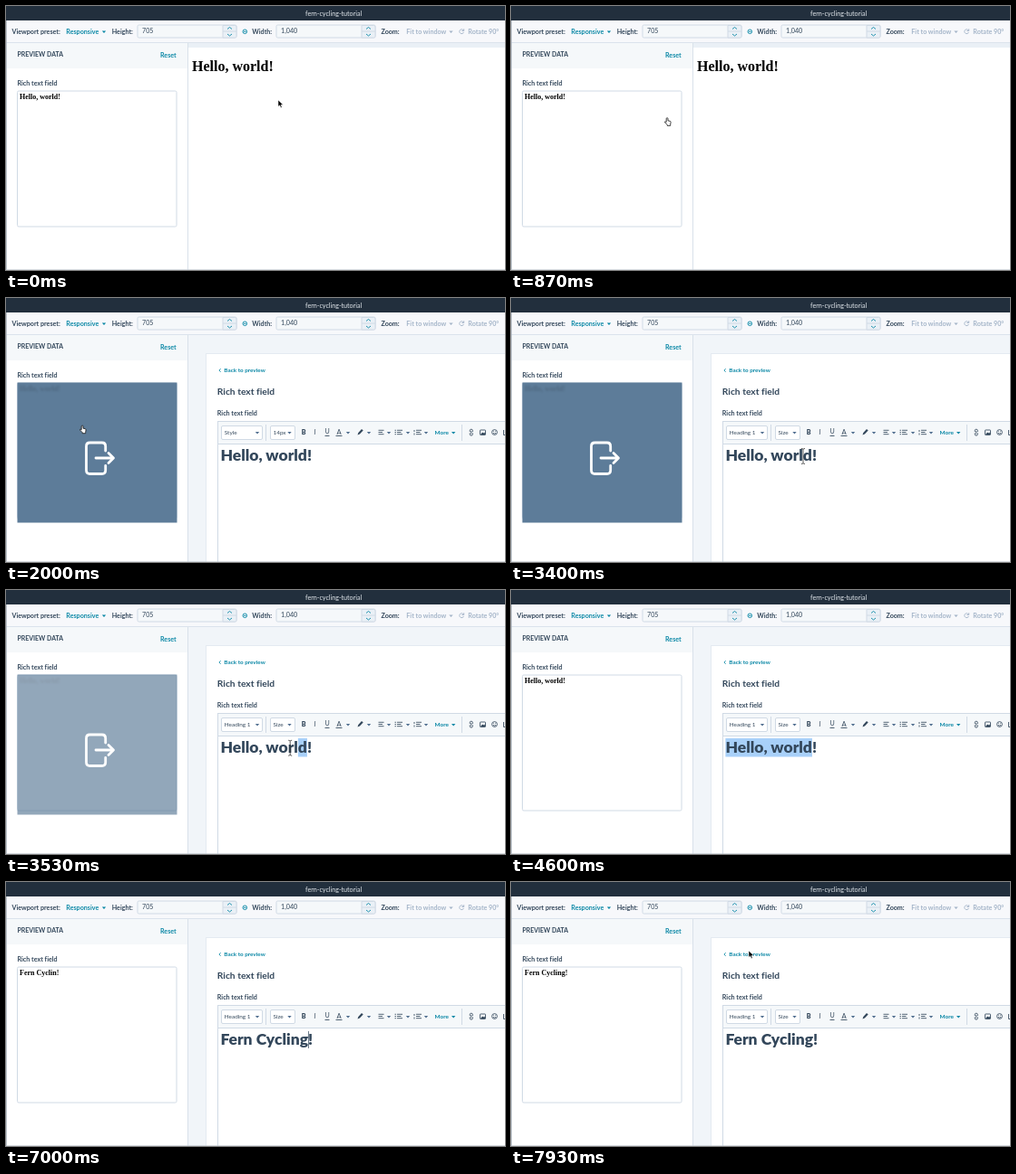
These frames come from a looping animation (550 px wide and 292 px high, 8 s). An HTML page:

```html
<!DOCTYPE html>
<html lang="en">
<head>
<meta charset="utf-8">
<title>Module preview</title>
<style>
  html, body { margin: 0; width: 100%; height: 100%; overflow: hidden; background: #fff; }
  svg { display: block; width: 550px; height: 292px; }
  text { font: 700 7.15px Lato, sans-serif; font-variant-ligatures: none; fill: #33475b; white-space: pre; }
  .reg { font-weight: 400; }
  .tool { font-size: 6.4px; }
  .link { fill: #0b88a6; }
  .off { fill: #a3b4c8; }
  .serif { font-family: "Liberation Serif", serif; fill: #000; }
  .box { fill: #f5f8fa; stroke: #d0dae5; }
  .white { fill: #fff; }
  .line { fill: none; stroke: #33475b; stroke-width: .85; }
  .teal { fill: none; stroke: #0b88a6; stroke-width: .9; }
  #blur { filter: blur(1.1px); }
</style>
</head>
<body>
<svg viewBox="0 0 550 292">
  <defs>
    <path id="down" d="M-2.2-1.1H2.2L0 1.5Z"/>
    <g id="spin">
      <rect class="box" x=".5" y=".5" width="109" height="14" rx="1.5"/>
      <path d="M94.5 1H108q1.5 0 1.5 1.5V13q0 1.5-1.5 1.5H94.5Z" fill="#eaf0f6" stroke="#d0dae5"/>
      <path d="M94.5 7.5h15" stroke="#d0dae5"/>
      <path class="teal" d="M99.5 5l2.5-2 2.5 2M99.5 10.5l2.5 2 2.5-2"/>
    </g>
    <path id="rows" class="line" d="M0-2.2H6M0 0H4.5M0 2.2H6"/>
  </defs>

  <rect width="550" height="292" fill="#fff"/>

  <!-- Rendered page -->
  <g id="page">
    <rect x="201" y="41" width="349" height="5" fill="#eaf0f6"/>
    <text class="serif" x="205" y="72" style="font-size:16px">Hello, world!</text>
  </g>

  <!-- Rich text editor -->
  <g id="editor">
    <rect x="201" y="41" width="349" height="251" fill="#f1f5f9"/>
    <rect x="220.5" y="61.5" width="340" height="240" fill="#fff" stroke="#e4eaf1"/>
    <path class="teal" d="M236.6 78.2l-1.7 1.8 1.7 1.8"/>
    <text class="link" x="240.3" y="82.1" style="font-size:6.35px">Back to preview</text>
    <text x="232.8" y="107.2" style="font-size:10.25px">Rich text field</text>
    <text x="232.8" y="130.3">Rich text field</text>
    <rect class="box white" x="233.5" y="136.5" width="330" height="170"/>
    <rect class="box" x="233.5" y="136.5" width="330" height="25"/>
    <rect class="box white" x="237.5" y="141.5" width="45" height="15" rx="1.5"/>
    <rect class="box white" x="291.5" y="141.5" width="27" height="15" rx="1.5"/>
    <path d="M286.5 140v18M502.5 140v18" stroke="#d0dae5"/>
    <text id="style" class="tool reg" x="240.8" y="151.2"></text>
    <text id="size" class="tool reg" x="294.5" y="151.2"></text>
    <text x="325.8" y="151.2" style="font-weight:900">B</text>
    <text class="reg" x="339.4" y="151.2" style="font-style:italic">I</text>
    <text class="reg" x="351.4" y="150.4">U</text>
    <path class="line" d="M351.5 152.5h5"/>
    <text class="reg" x="364.5" y="150.5" style="font-size:7.6px">A</text>
    <path class="line" d="M363.5 152.5h7"/>
    <path d="M387.5 151.5l.8-2.5 3.7-4 1.7 1.6-3.8 4Z" fill="#33475b"/>
    <g id="marks" fill="#516f90"></g>
    <use href="#rows" x="410.5" y="148.5"/>
    <use href="#rows" x="431" y="148.5"/>
    <use href="#rows" x="452" y="148.5"/>
    <path class="line" d="M428.5 146.3h1.5M428.5 148.5h1.5M428.5 150.7h1.5M450 146v2M450 149.5v2"/>
    <text class="tool link" x="472.6" y="151.2">More</text>
    <use href="#down" x="493.2" y="149" fill="#0b88a6"/>
    <path class="line" d="M511.3 148v-1.5q0-1.3 1.5-1.3t1.5 1.3v1.5M511.3 149.3v1.5q0 1.3 1.5 1.3t1.5-1.3v-1.5M512.8 147v3.3"/>
    <rect class="line" x="522.5" y="146" width="6" height="5.5" rx=".6"/>
    <path d="M523 151l2-2.5 1.3 1 1-1 1.2 2.5Z" fill="#33475b"/>
    <circle class="line" cx="538.5" cy="148.5" r="2.9"/>
    <path class="line" d="M537 149.3q1.5 1.6 3 0M537.4 147.3v.7M539.6 147.3v.7"/>
    <path class="line" d="M548.5 146v5.5h2"/>
    <rect id="sel" y="164" height="20.5" fill="#a8d0f9"/>
    <text id="draft" x="236.4" y="180.2" style="font-size:17.5px;font-weight:900">Hello, world!</text>
    <rect id="caret" y="165" width="1" height="19" fill="#6d7c8b"/>
  </g>

  <!-- Side panel -->
  <rect x="0" y="41" width="200" height="28" fill="#f5f8fa"/>
  <path d="M200.5 41V292" stroke="#d9e1ea"/>
  <text x="12.5" y="56" style="font-size:6.95px">PREVIEW DATA</text>
  <text class="link" x="170" y="57.2">Reset</text>
  <text x="12.5" y="87.8">Rich text field</text>
  <rect class="box white" x="12.5" y="94" width="175.5" height="150" rx="1.5"/>
  <text id="small" class="serif" x="15" y="103.3" style="font-size:8px">Hello, world!</text>
  <g id="cover">
    <rect x="12.5" y="93.5" width="176" height="155" fill="#5d7c99"/>
    <text id="blur" class="serif" x="15" y="103.3" style="font-size:8px">Hello, world!</text>
    <path d="M109.7 169v-5q0-4-4-4H92.5q-4 0-4 4v26.5q0 4 4 4h13.2q4 0 4-4v-5M99 177h19M113 171.5l5.5 5.5-5.5 5.5"
      fill="none" stroke="#fff" stroke-width="2.8" stroke-linecap="round" stroke-linejoin="round"/>
  </g>

  <!-- Top bars -->
  <rect y="16" width="550" height="25" fill="#f7f8fb"/>
  <rect width="550" height="16" fill="#222f3d"/>
  <text class="reg" x="330" y="11" style="fill:#e6ebf0">fern-cycling-tutorial</text>
  <path d="M0 40.5H550" stroke="#dbe3ec"/>
  <text x="6.5" y="30.5">Viewport preset:</text>
  <text class="link" x="66.3" y="30.5">Responsive</text>
  <use href="#down" x="108" y="28.5" fill="#0b88a6"/>
  <text x="116.7" y="30.5">Height:</text>
  <use href="#spin" x="144.5" y="20.5"/>
  <text class="reg" x="150" y="30">705</text>
  <circle class="teal" cx="263.3" cy="28.3" r="2.3"/>
  <path class="teal" d="M261.8 28.3h3"/>
  <text x="271.3" y="30.5">Width:</text>
  <use href="#spin" x="297.5" y="20.5"/>
  <text class="reg" x="303" y="30">1,040</text>
  <text x="413.5" y="30.5">Zoom:</text>
  <text class="off" x="441.3" y="30.5">Fit to window</text>
  <use href="#down" x="490.5" y="28.5" class="off"/>
  <path d="M504.4 27.2a2.4 2.4 0 1 0 .1 1.8M504.7 25.3v2.2h-2.2" fill="none" stroke="#a3b4c8" stroke-width=".9"/>
  <text class="off" x="509.3" y="30.5">Rotate 90°</text>
  <path d="M.5 16V292" stroke="#a9b2bc" stroke-width=".8"/>
  <path d="M0 291.6H550" stroke="#c3cad2" stroke-width=".7"/>

  <!-- Pointers -->
  <path id="arrow" d="M0 0V7.3l1.7-1.5 1.2 2.6 1.3-.5-1.2-2.6H5.4Z" stroke="#fff" stroke-width=".5"/>
  <path id="hand" d="M.2 4.8V1q.1-1 .9-1t.9 1v2.2l2.2.4q1 .3.9 1.3L4.7 7.4V8.7H1.2V7.7L-1.5 5q-.2-1 .8-.8Z"
    fill="#fff" stroke="#111" stroke-width=".8"/>
  <path id="beam" d="M-2-8.5Q0-8.5 0-7.5 0-8.5 2-8.5M0-7.5V7.5M-2 8.5Q0 8.5 0 7.5 0 8.5 2 8.5"
    fill="none" stroke="#333" stroke-width=".8"/>
</svg>
<script>
const LOOP = 8000, FPS = 15;
const $ = id => document.getElementById(id);
const show = (id, on) => $(id).style.display = on ? '' : 'none';
const GREETING = 'Hello, world', TITLE = 'Fern Cycling';

$('marks').innerHTML = [277, 312.5, 377, 400, 422, 443, 463]
  .map(x => `<use href="#down" x="${x}" y="149"/>`).join('');

// Tracks hold rows of [time, ...values].
const move = [[600, 300, 104], [800, 215, 118], [1000, 83, 135], [1130, 83, 141],
  [2330, 83, 141], [2800, 238, 160], [3200, 342, 186], [3270, 334, 179], [3400, 322, 175],
  [3930, 287, 174], [4070, 287, 174], [4400, 237, 174],
  [7200, 285, 174], [7600, 269, 118], [7930, 262, 76]];
const cover = [[870, 0], [1000, .84], [1130, 1], [3400, 1], [3800, 0]];
const pick = [[3400, 12], [3930, 7], [4070, 7], [4400, 0]];

// Times at which each further letter of the title appears.
const typed = [4670, 4800, 4930, 5270, 5730, 5930, 6070, 6200, 6330, 6400, 6470, 7000];
const synced = [5000, 5270, 5470, 6000, 6070, 6200, 6330, 6470, 6600, 6600, 6600, 7270];

function at(track, t) {
  const i = track.findIndex(row => row[0] > t);
  if (i === 0) return track[0].slice(1);
  if (i < 0) return track[track.length - 1].slice(1);
  const a = track[i - 1], b = track[i], k = (t - a[0]) / (b[0] - a[0]);
  return a.slice(1).map((v, n) => v + (b[n + 1] - v) * k);
}

const count = (times, t) => times.filter(x => x <= t + 4).length;
const write = (id, text) => { if ($(id).textContent !== text) $(id).textContent = text; };
const edge = n => 236.4 + (n ? $('draft').getSubStringLength(0, n) : 0);

function drawPointer(t) {
  const [x, y] = at(move, t);
  const hidden = t > 4590 && t < 7260;
  const inField = x > 12 && x < 188 && y > 93;
  const inText = t > 2000 && x > 233 && y > 161;
  const kind = hidden ? '' : inField ? 'hand' : inText ? 'beam' : 'arrow';
  for (const id of ['arrow', 'hand', 'beam']) {
    show(id, id === kind);
    $(id).setAttribute('transform', `translate(${x} ${y})`);
  }
}

function draw(t) {
  const editing = t > 1990, focused = t > 3320;
  show('page', !editing);
  show('editor', editing);
  write('style', focused ? 'Heading 1' : 'Style');
  write('size', focused ? 'Size' : '14px');

  const n = count(typed, t), m = count(synced, t);
  write('draft', (n ? TITLE.slice(0, n) : GREETING) + '!');
  write('small', (m ? TITLE.slice(0, m) : GREETING) + '!');

  const shade = at(cover, t)[0];
  $('cover').style.opacity = shade;
  $('blur').style.opacity = editing ? .16 : .5 - shade * .28;
  show('small', shade < .5);

  const start = Math.round(at(pick, t)[0]);
  const selecting = focused && !n && start < GREETING.length;
  show('sel', selecting);
  if (selecting) {
    $('sel').setAttribute('x', edge(start));
    $('sel').setAttribute('width', edge(GREETING.length) - edge(start));
  }

  const caret = n > 0 && t < 7260;
  show('caret', caret);
  if (caret) $('caret').setAttribute('x', Math.round(edge(n)));
  drawPointer(t);
}

const begin = performance.now();
function tick() {
  const t = (performance.now() - begin) % LOOP;
  draw(Math.floor((t + 4) * FPS / 1000) * 1000 / FPS);
  requestAnimationFrame(tick);
}
tick();
</script>
</body>
</html>
```
